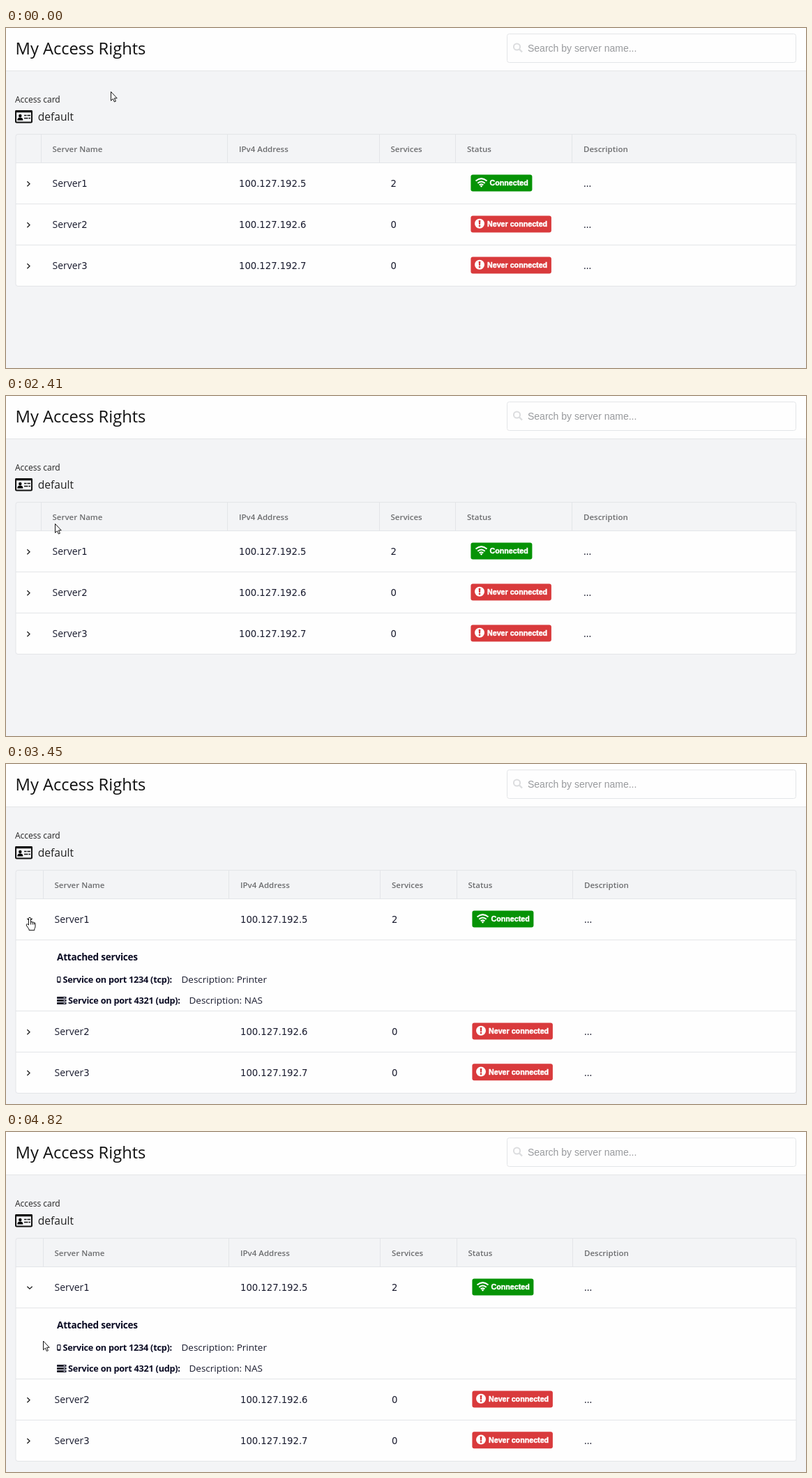
These frames come from a looping animation (1147x488 px, 6270 ms). An HTML page:

```html
<!DOCTYPE html>
<html lang="en">
<head>
<meta charset="utf-8">
<title>My Access Rights</title>
<style>
  html, body { margin: 0; width: 100%; height: 100%; overflow: hidden; background: #f3f4f6; }
  svg { display: block; width: 1147px; height: 488px; }
  text { font-family: "Open Sans", "Noto Sans", sans-serif; fill: #191b2e; white-space: pre; }
  .title { font-size: 23.7px; fill: #111; }
  .label { font-size: 12px; fill: #222; }
  .card { font-size: 15.6px; fill: #222; }
  .head { font-size: 11.5px; font-weight: 600; fill: #6c6d6f; }
  .cell { font-size: 14px; }
  .num { font: 13.2px "DejaVu Sans", sans-serif; }
  .group { font-size: 13.6px; font-weight: 700; letter-spacing: -.25px; fill: #0b0c24; }
  .port { font-size: 12.7px; font-weight: 700; letter-spacing: -.25px; fill: #0b0c24; }
  .note { font-size: 13.5px; }
  .search { font: 14px "Liberation Sans", Arial, sans-serif; fill: #989a9d; }
  .badge { font: bold 10.7px "Liberation Sans", Arial, sans-serif; fill: #fff; stroke: #fff; stroke-width: .45px; }
  .line { fill: none; stroke: #e3e5e8; }
  .chevron { fill: none; stroke: #1c1c1c; stroke-width: 1.3; }
  .pointer { fill: #fff; stroke: #151515; stroke-linejoin: round; }
</style>
</head>
<body>
<svg id="stage" viewBox="0 0 1147 488"></svg>
<script>
const LOOP = 6270, OPEN_AT = 3450;
const stage = document.getElementById("stage");

const text = (x, y, kind, s) => `<text x="${x}" y="${y}" class="${kind}">${s}</text>`;
const rect = (x, y, w, h, fill, r = 0) =>
  `<rect x="${x}" y="${y}" width="${w}" height="${h}" rx="${r}" fill="${fill}"/>`;
const path = (d, attrs) => `<path d="${d}" ${attrs}/>`;

const wifi = `<g fill="none" stroke="#fff" stroke-width="2">
  <path d="M-8,-2.3Q0,-9 8,-2.3M-5.2,1Q0,-3.5 5.2,1M-2.8,3.6Q0,1.4 2.8,3.6"/>
  <circle cy="5.3" r="1.3" fill="#fff" stroke="none"/></g>`;
const alertIcon = `<circle r="7" fill="#fff"/>` +
  path("M-1.4,-4.7H1.4L1,1.2H-1Z", 'fill="#d93a3c"') + `<circle cy="3.3" r="1.4" fill="#d93a3c"/>`;

function badge(x, mid, online) {
  const [w, fill, icon, dx, tx, label] = online
    ? [88, "#069306", wifi, 15.5, 27.5, "Connected"]
    : [115.5, "#d93a3c", alertIcon, 13, 24, "Never connected"];
  return rect(x + .4, mid - 11.8, w, 24, fill, 3) +
    `<g transform="translate(${x + dx},${mid - .5})">${icon}</g>` +
    text(x + tx, mid + 4, "badge", label);
}

function services() {
  const bars = [334, 338, 342].map(y =>
    rect(73, y, 13.5, 2.9, "#14152a", .6) + rect(82.5, y + 1, 2.5, 1, "#fff")).join("");
  return text(73, 282, "group", "Attached services") +
    `<rect x="73.6" y="305.6" width="4.4" height="7.8" rx=".8" fill="#fff" stroke="#14152a" stroke-width="1.1"/>` +
    rect(74, 311.7, 3.6, 1.2, "#14152a") +
    text(81.5, 314, "port", "Service on port 1234 (tcp):") +
    text(251.5, 314, "note", "Description: Printer") + bars +
    text(89, 344, "port", "Service on port 4321 (udp):") +
    text(262.5, 344, "note", "Description: NAS");
}

function table(open) {
  const cols = open ? [53, 319.5, 536.5, 646, 812.5] : [50, 317.5, 535, 644.5, 811.5];
  const mids = open ? [222.5, 383.5, 442.3] : [222.5, 281.5, 340.5];
  const rules = open ? [193.5, 252.5, 354.5, 413.5] : [193.5, 252.5, 311.5];
  const bottom = open ? 472.5 : 370.5;
  const heads = ["Server Name", "IPv4 Address", "Services", "Status", "Description"];
  const at = cols.map(x => x + 16.5);

  let out = rect(14, 193, 1119, bottom - 193, "#fefefe", 3);
  out += cols.map((x, i) => path(`M${Math.floor(x) + .5},153V193`, 'class="line"') +
    text(at[i], 178, "head", heads[i])).join("");
  out += rules.map(y => path(`M14,${y}H1133`, 'class="line"')).join("");
  out += `<rect x="14" y="152.5" width="1119" height="${bottom - 152.5}" rx="3" class="line"/>`;
  mids.forEach((y, i) => {
    const arrow = open && !i ? "M30.4,221.7L34,225.2L37.6,221.7" : `M30.4,${y - 2.3}l3.6,3.5l-3.6,3.5`;
    out += path(arrow, 'class="chevron"') +
      text(at[0], y + 5.3, "cell", `Server<tspan class="num">${i + 1}</tspan>`) +
      text(at[1], y + 5.3, "num", "100.127.192." + (i + 5)) +
      text(at[2], y + 5.3, "num", i ? 0 : 2) +
      badge(open ? 668 : 666, y - .2, !i) +
      text(at[4], y + 5.5, "cell", "...");
  });
  return out + (open ? services() : "");
}

const cardIcon = `<rect x="14" y="119" width="23" height="16.6" rx="1.5" fill="none" stroke="#111" stroke-width="2"/>` +
  rect(13, 118, 25, 3.2, "#111", 1.5) + `<circle cx="20.3" cy="126" r="2.2"/>` +
  path("M16.2,132.6Q16.2,128.6 20.3,128.6Q24.4,128.6 24.4,132.6Z", "") +
  path("M26,125.5h3.5m1,0h4.5M26,129.5h5.5m1,0h2.5", 'stroke="#111" stroke-width="1.5"');

stage.innerHTML =
  rect(0, 0, 1147, 488, "#f3f4f6") + rect(0, 0, 1147, 61, "#fefefe") +
  path("M0,61.5H1147", 'class="line"') + text(13.5, 38, "title", "My Access Rights") +
  `<rect x="718.5" y="8.5" width="414" height="41" rx="3" class="line"/>` +
  `<g fill="none" stroke="#dcdddf" stroke-width="2"><circle cx="732.5" cy="27" r="4.6"/>` +
  path("M736,30.5L740,34.5", 'stroke-width="2.4"') + `</g>` +
  text(748, 34, "search", "Search by server name...") +
  text(13, 107, "label", "Access card") + cardIcon + text(45.7, 132.6, "card", "default") +
  `<g id="closed">${table(false)}</g><g id="opened">${table(true)}</g>` +
  `<g id="cursor" class="pointer">` +
  path("M.5,.5V13.3L3.4,10.6L5.4,15L7.4,14.1L5.4,9.8H9.2Z", 'id="arrow"') +
  path("M-1.5,11V1.5Q-1.5,.3 0,.3Q1.5,.3 1.5,1.5V7Q3.2,5.6 4.1,7.2Q5.7,6.2 6.3,7.9Q8,7.4 8,9.2V13Q8,15 6.8,16.5V18.6H-1V17L-4.6,12Q-5.3,9.4 -3.4,9.6ZM1.5,7V10.5M4.1,7.2V10.5M6.3,7.9V10.5", 'id="hand"') +
  `</g>`;

const [closed, opened, cursor, arrow, hand] =
  ["closed", "opened", "cursor", "arrow", "hand"].map(id => document.getElementById(id));
const show = (el, on) => el.setAttribute("visibility", on ? "visible" : "hidden");

const easeIn = u => u ** 1.3;
const easeOut = u => 1 - (1 - u) ** 1.5;
// time, x, y, easing towards the next point
const route = [
  [1510, 150, 93, easeIn],
  [2407, 70, 183, easeOut],
  [2890, 34, 220, easeOut],
  [3910, 34, 220, easeOut],
  [4120, 40, 247, easeOut],
  [4820, 53, 299.5, easeOut]
];

// The pointer is sampled in steps while it moves.
function sample(t) {
  if (t < 2890) return 1510 + 69 * Math.floor((t - 1508) / 69);
  if (t < 3930) return 2890;
  return Math.min(4820, 4820 - 70 * Math.ceil((4820 - t) / 70));
}

function pointerAt(t) {
  if (t < 1510) return [150, 91];
  const s = sample(t);
  const i = route.findIndex(p => p[0] > s);
  if (i < 0) return route[route.length - 1].slice(1, 3);
  const [t0, x0, y0, ease] = route[Math.max(0, i - 1)], [t1, x1, y1] = route[i];
  const u = ease((s - t0) / (t1 - t0));
  return [x0 + (x1 - x0) * u, y0 + (y1 - y0) * u].map(Math.round);
}

function draw(t) {
  const open = t >= OPEN_AT, hover = t >= 2750 && t < 4050;
  show(closed, !open);
  show(opened, open);
  show(arrow, !hover);
  show(hand, hover);
  cursor.setAttribute("transform", `translate(${pointerAt(t)})`);
}

const start = performance.now();
function tick() {
  draw((performance.now() - start) % LOOP);
  requestAnimationFrame(tick);
}
tick();
</script>
</body>
</html>
```
